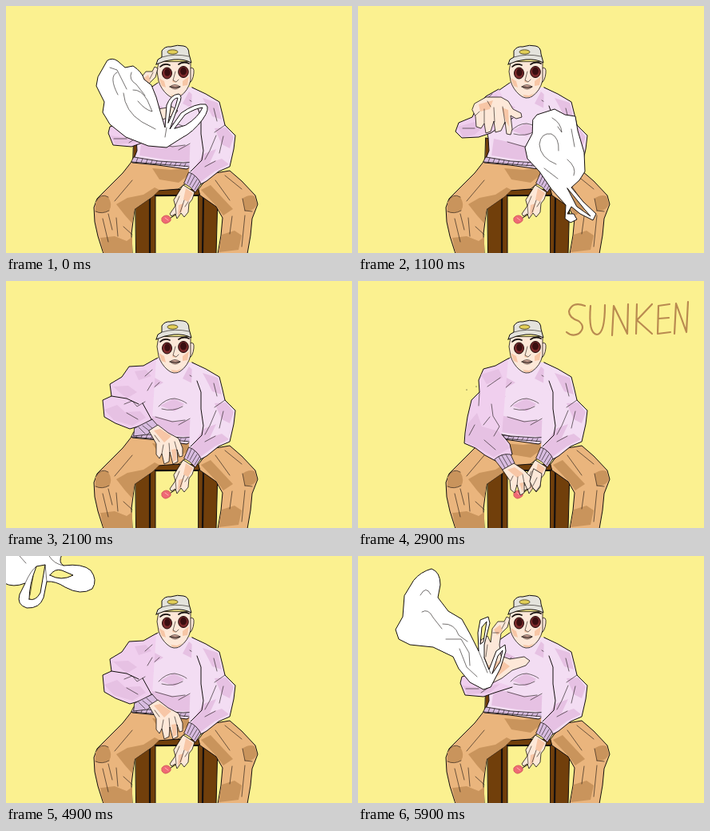
Write an HTML page that moves like this. It is 433 px wide and 309 px high and loops after 6100 ms.

```html
<!DOCTYPE html>
<html lang="en">
<meta charset="utf-8">
<title>Bag and stool</title>
<style>
html, body { margin: 0; width: 100%; height: 100%; overflow: hidden; background: #fbf190 }
svg { display: block; width: 100%; height: 100% }
path { fill: none; stroke: #15100f; stroke-linejoin: round; stroke-linecap: round }
.wool { fill: #f3ddf3 }
.sleeve { fill: #f0cfee }
.cuff { fill: #d8bce0; stroke-width: .8 }
.pants { fill: #eab57d }
.wood { fill: #713f0b }
.skin { fill: #fde8d8; stroke-width: .8 }
.bag { fill: #fff; fill-rule: evenodd }
.shade path { stroke: none }
.plum path { fill: #e6c1e3 }
.tan path { fill: #c9945c }
.blush path { fill: #f7c6a6 }
.thin { stroke-width: .6 }
.bold { stroke-width: 2.2 }
.title path { stroke: #b98a50; stroke-width: 2.2 }
[data-at] { display: none }
</style>
<svg viewBox="0 0 433 309">
  <!-- stool -->
  <path class="wood" d="M160 230L272 229L272 237L160 238Z"/>
  <path class="wood" d="M162 236L187 236L187 310L163 310ZM241 236L265 236L263 310L241 310Z"/>
  <path class="bold" d="M180 239L180 309M247 239L246 309M187 237L241 237"/>
  <path class="wood" data-at="0-1500 5400-6100" d="M160 165L173 168L172 198L159 198Z"/>

  <!-- trousers -->
  <path class="pants" d="M157 195L146 209L132 223L114 241L110 252L111 270L115 288L122 310L158 310L157 285L161 254L184 238L190 231L216 229L230 218L236 201L218 198Z"/>
  <path class="pants" d="M241 229L256 210L280 206L295 219L312 237L315 248L308 266L306 287L302 310L265 310L269 287L271 265L263 251L243 237Z"/>
  <g class="shade tan">
    <path d="M112 245Q119 234 128 239Q134 249 129 256Q119 261 112 257Z"/>
    <path d="M138 248L152 240L172 236L186 227L192 230L184 238L161 254L158 272L149 262Z"/>
    <path d="M118 290L136 288L151 294L158 289L158 309L122 309Z"/>
    <path d="M183 203L207 205L228 202L229 211L216 221L192 217Z"/>
    <path d="M296 241Q304 235 311 238L314 248Q309 258 299 256Z"/>
    <path d="M244 230L256 224L270 239L284 254L272 262L263 250Z"/>
    <path d="M270 286L286 281L295 287L291 305L266 308Z"/>
  </g>
  <path class="thin" d="M112 245Q119 233 128 239M112 257Q120 261 129 256M296 241L299 256M299 256L308 257M136 244L158 218M121 266L128 295M138 265L140 288M128 260L133 280M158 286L147 276M262 218L280 243M283 263L280 285M299 262L295 301M274 212L295 229"/>

  <!-- jumper -->
  <path class="wool" d="M190 96L177 105L163 114L157 138L163 165L164 181L158 196L190 199L226 204L246 193L262 175L262 126L250 112L233 102"/>
  <g class="shade plum">
    <path d="M170 166L188 170L212 176L236 173L245 184L231 195L199 192L167 187Z"/>
    <path d="M193 156L210 147L223 154L211 163Z"/>
    <path d="M229 107L240 117L237 130L221 122Z"/>
    <path d="M171 126L186 121L197 127L181 136L168 135Z"/>
    <path d="M169 139L185 144L176 154L167 151Z"/>
  </g>
  <path class="cuff" d="M160 189L191 194L222 196L236 195L233 201L205 199L157 195Z"/>
  <path class="thin" d="M165 190L163 195M171 191L169 196M177 192L175 197M183 193L181 198M189 194L187 198M195 195L193 199M201 195L199 199M207 196L205 199M213 196L211 200M219 197L217 200M225 197L223 201"/>
  <path class="thin" d="M191 157Q200 147 211 147Q221 149 226 153M195 160Q209 164 221 157M182 136L192 127M187 170L208 176L224 174M216 180L234 170M230 118L240 124"/>

  <!-- resting arm -->
  <path class="wool" d="M233 102L250 110L267 120L271 136L274 149L287 162L285 179L280 201L266 207L251 219L242 224L229 211"/>
  <g class="shade plum">
    <path d="M246 115L265 121L270 142L258 138L253 128Z"/>
    <path d="M261 153L276 152L285 164L280 178L270 173Z"/>
    <path d="M247 185L263 179L255 196L270 191L279 198L261 207L242 221L231 210Z"/>
  </g>
  <path d="M239 125L244 139L244 160L247 181L245 193L231 207"/>
  <path class="thin" d="M274 149L261 158M263 162L255 181L249 192M272 163L267 184M260 128L264 144M249 201L262 194"/>
  <path class="cuff" d="M229 208Q238 211 244 222L237 233Q230 225 223 222Z"/>
  <path class="thin" d="M232 210L227 222M236 213L230 224M239 217L233 227M242 220L236 230"/>
  <path d="M203 267L214 260"/>
  <path class="skin" d="M222 224L236 233L233 242L229 247L228 258L223 264L219 259L214 266L212 260L207 263L205 260L212 250L210 243Z"/>
  <g class="shade blush"><path d="M225 228L234 234L228 245L222 242ZM216 249L222 247L220 257L215 263Z"/></g>
  <path class="thin" d="M217 238L212 250L213 260M223 243L218 258M228 245L224 251"/>
  <path style="fill:#ef6974;stroke:#bd3a48" class="thin" d="M195 265Q199 260 204 263Q209 268 203 271Q198 274 195 269Z"/>
  <path style="stroke:#ffb4b0" d="M199 265L203 268"/>

  <!-- head -->
  <path class="skin" d="M230 78Q236 75 235 84Q234 94 229 97Z"/>
  <path class="skin" d="M191 70L189 82L191 94Q194 104 202 111Q210 118 218 113Q228 106 231 93L231 70Z"/>
  <g class="shade blush"><path d="M191 90L198 94L200 102L195 100ZM229 88L221 94L221 100L227 99ZM209 92L208 95L213 96ZM206 111L214 112L221 109L215 114L209 114Z"/></g>
  <g fill="#7d2b2c" stroke="#1a0708">
    <ellipse cx="201.5" cy="84" rx="6" ry="7"/><ellipse cx="222" cy="82.5" rx="6.3" ry="7"/>
  </g>
  <g fill="#3a0f11"><ellipse cx="202" cy="83" rx="3.7" ry="4.8"/><ellipse cx="222" cy="81.5" rx="4" ry="4.8"/></g>
  <path style="stroke-width:1.7" d="M193 76Q198 71 205 74M216 73Q222 69 229 72"/>
  <path class="thin" d="M212 82L209 93L213 95L216 92"/>
  <path class="thin" style="fill:#d2a596" d="M205 101Q211 96 218 101Q212 107 205 101Z"/>
  <path d="M206 101Q212 103 218 101"/>
  <path style="fill:#e4e3dc" d="M188 73L190 67L195 64L195 56Q199 50 206 51Q215 48 222 50Q229 51 229 60L232 71Q223 66 210 67Q198 68 188 73Z"/>
  <path class="thin" d="M195 64Q211 59 229 63"/>
  <ellipse cx="208.5" cy="57.5" rx="6.5" ry="2.7" fill="#e3cf58" stroke="#3b3516" stroke-width=".8"/>

  <!-- raised arm -->
  <g data-at="0-1100 5400-6100">
    <path class="sleeve" d="M145 147L130 151L128 159L134 174L157 176L171 171L193 164"/>
    <g class="shade plum"><path d="M131 162L151 165L178 160L165 171L137 173Z"/></g>
    <path class="thin" d="M135 166L151 166M154 171L166 163"/>
    <path class="skin" d="M154 147L149 123L154 105L162 100L166 108L168 91L175 82L183 82L186 76L190 78L187 89L179 97L177 111L179 125L190 129L208 126L215 131L210 137L193 143L180 153L166 160Z"/>
    <g class="shade blush"><path d="M170 92L178 86L181 94L174 99ZM160 138L179 130L190 138L170 154Z"/></g>
    <path class="thin" d="M169 96L176 96M162 111L160 126M181 130L173 140M184 83L180 91"/>
  </g>

  <!-- arm letting go -->
  <g data-at="1100-1500">
    <path class="sleeve" d="M176 104L160 113L150 123L143 139L126 146L122 157L130 165L151 164L166 159L194 140"/>
    <g class="shade plum"><path d="M125 151L146 145L155 153L146 161L131 164ZM160 115L173 111L183 118L165 121Z"/></g>
    <path class="thin" d="M131 153L146 153M161 116L168 110"/>
    <path class="skin" d="M146 122L160 114L179 114L188 119L194 129L204 134L205 139L198 141L191 137L193 154L191 161L186 160L184 145L179 156L172 158L170 144L166 157L160 159L158 147L154 153L148 151L147 138L143 130Z"/>
    <g class="shade blush"><path d="M151 123L169 118L165 129L153 132ZM180 127L188 130L189 151L185 144Z"/></g>
    <path class="thin" d="M158 147L158 129M171 145L170 127M184 146L181 126M147 137L152 132M162 119L166 126"/>
  </g>

  <!-- arm lowering -->
  <g data-at="1500-2100">
    <path class="sleeve" d="M188 97L151 113L149 123L136 135L124 139L125 151L132 165L157 166L170 158L189 150"/>
    <g class="shade plum"><path d="M127 142L145 137L157 150L153 163L134 164ZM154 114L168 111L178 119L160 125Z"/></g>
    <path class="thin" d="M137 136L155 136L165 129M133 154L149 151M169 132L162 144M174 116L183 111"/>
    <path class="cuff" d="M158 154L179 144L186 151L163 164Z"/>
    <path class="skin" d="M160 158L178 150L192 155L201 168L215 178L216 184L208 185L201 180L204 193L199 201L195 195L193 182L189 193L184 194L182 182L178 190L172 192L171 180L167 189L161 187L162 173L157 166Z"/>
    <g class="shade blush"><path d="M165 162L179 158L177 170L167 172ZM195 169L202 178L198 192L194 181Z"/></g>
    <path class="thin" d="M171 180L172 169M182 183L182 168M193 183L190 166M176 157L184 161"/>
  </g>

  <!-- arm on thigh -->
  <g data-at="2100-2700 4900-5400">
    <path class="sleeve" d="M188 97L172 106L154 107L145 120L130 129L132 144L121 149L123 170L137 178L155 185L169 181L183 173"/>
    <g class="shade plum"><path d="M123 161L139 155L149 164L168 163L175 171L158 181L135 174ZM134 132L153 131L164 139L151 147ZM161 113L175 111L182 119L166 124Z"/></g>
    <path d="M132 144L151 147L166 154M171 153L182 173"/>
    <path class="thin" d="M148 154L158 150L164 157L174 151M151 165L165 173M174 119L183 111M183 127L177 137"/>
    <path class="cuff" d="M161 184L183 173L190 181L177 192L160 194Z"/>
    <path class="thin" d="M166 183L174 191M171 181L180 188M176 178L184 185"/>
    <path class="skin" d="M179 187L190 180L203 190L216 197L221 209L221 219L217 220L214 211L215 226L209 229L205 214L204 226L198 229L195 216L192 222L188 217L188 204Z"/>
    <g class="shade blush"><path d="M185 187L193 185L207 194L198 202ZM207 211L213 210L213 224L209 226Z"/></g>
    <path class="thin" d="M195 216L197 205M205 215L204 203M214 212L211 201M186 193L192 201"/>
  </g>

  <!-- hands together -->
  <g data-at="2700-4900">
    <path class="sleeve" d="M188 97L172 106L157 110L151 124L152 139L142 149L137 170L134 190L133 203L147 209L159 218L172 225L193 217L190 204L180 192"/>
    <g class="shade plum"><path d="M137 179L149 165L155 182L176 188L190 209L170 220L151 209L134 201ZM154 117L176 110L181 121L161 129Z"/></g>
    <path class="thin" d="M152 139L151 156M146 180L139 193M167 154L169 169L177 182L170 194M158 199L172 211M162 132L178 121M165 170L157 180M180 192L193 195"/>
    <path class="cuff" d="M171 223Q180 215 191 217L196 228L182 237Z"/>
    <path class="thin" d="M176 220L184 234M180 218L188 232M185 217L192 229"/>
    <path class="skin" d="M181 236L195 228L207 236L216 245L216 258L212 261L208 252L208 265L203 268L199 255L196 265L191 261L190 250Z"/>
    <path class="skin" d="M220 235L230 241L228 256L223 263L219 259L215 251Z"/>
    <g class="shade blush"><path d="M187 236L196 233L207 241L199 246ZM202 253L207 252L206 264Z"/></g>
    <path class="thin" d="M199 256L200 245M208 253L206 242M191 250L194 244M224 246L219 256"/>
    <g fill="#111"><circle cx="148" cy="132" r=".6"/><circle cx="136" cy="136" r=".6"/></g>
  </g>

  <!-- bag -->
  <g data-at="0-200">
    <path class="bag" d="M127 68Q133 64 140 69L149 77L159 75Q170 82 173 92L182 99L188 114L193 132L199 152L201 124Q206 111 216 110Q222 112 216 124L205 154L219 134Q237 121 250 123Q256 128 246 142Q234 158 220 165L201 177L178 175L150 164L130 148L121 133L123 120L113 100L115 89ZM203 146L207 122Q210 115 215 115L212 126ZM211 153L224 136Q237 128 246 127Q241 139 225 149Z"/>
    <path class="thin" d="M130 77L139 80L151 104M140 111Q128 88 139 83M157 83Q153 92 163 98L174 112M147 109Q149 132 170 145L187 154M159 105Q169 104 177 118L183 132Q174 130 165 119M201 152L199 164"/>
  </g>
  <g data-at="200-400">
    <path class="bag" d="M164 111L177 101L204 97L222 105L244 107L263 120L272 139L266 156L249 167L226 172L207 179L190 173L180 160L165 151L157 132Z"/>
    <path class="thin" d="M180 113Q170 132 189 148M204 109Q226 113 234 132L229 147M190 162L208 151L221 158M249 121L258 139"/>
  </g>
  <g data-at="400-600">
    <path class="bag" d="M198 128L216 112L243 104L270 96L292 103L309 119L312 140L299 158L279 169L255 176L239 181L231 168L211 167L196 154L205 147Z"/>
    <path class="thin" d="M225 124Q210 143 231 156M250 113Q276 109 288 126L284 145M238 164L254 152L266 158M294 116L300 133"/>
  </g>
  <g data-at="600-1100">
    <path class="bag" d="M226 119L250 105L278 104L303 117L315 145L309 177L296 203L286 219L290 238L281 240L273 218L261 223L253 216L257 207L232 190L219 164L215 140Z"/>
    <path class="thin" d="M236 139Q226 167 251 182M255 119Q283 120 290 146L280 173M264 211L274 191M292 129L302 153"/>
  </g>
  <g data-at="1100-1300">
    <path class="bag" d="M219 142L224 136L246 129L259 136L272 138L275 156L283 183L284 207L277 218L267 227L282 245L298 260L294 268L278 260L267 251L262 260L270 260L274 267L266 271L259 266L260 249L242 229L227 207L212 191L209 177L218 160ZM262 228L284 255L291 263L274 251Z"/>
    <path class="thin" d="M248 198Q228 190 227 173Q229 158 242 160Q252 165 251 181M243 140Q254 146 255 158L250 151M267 154L271 176M262 192Q274 202 270 212M233 203L250 216"/>
  </g>
  <g data-at="1300-1500">
    <path class="bag" d="M224 181L244 172L269 175L292 181L302 201L300 228L303 249L292 267L291 285L281 304L273 301L277 282L268 279L260 295L250 291L253 273L236 255L225 227Z"/>
    <path class="thin" d="M251 199Q236 217 251 235L269 233M275 196L287 212L283 231M259 260L276 251"/>
  </g>
  <g data-at="1500-1600">
    <path class="bag" d="M231 205L249 196L275 198L294 199L303 218L298 237L302 257L291 275L289 294L280 308L271 296L262 307L251 298L244 280L235 253L230 226Z"/>
    <path class="thin" d="M251 222Q240 239 254 252L268 246M273 220L285 233L280 250M259 285L274 274"/>
  </g>
  <g data-at="1600-1700">
    <path class="bag" d="M235 219L246 212L266 216L278 208L291 210L299 219L297 239L301 258L293 277L291 296L284 309L279 307L276 297L269 308L261 309L258 302L249 302L242 288L244 272L235 256L232 237Z"/>
    <path class="thin" d="M249 232Q259 225 268 232L270 248Q259 252 251 248ZM272 257Q283 251 288 260L284 277L269 278M261 305L264 296M279 308L285 300"/>
  </g>
  <g data-at="1700-1900">
    <path class="bag" d="M231 274L244 260L268 263L290 256L310 268L317 287L312 310L232 310Z"/>
    <path class="thin" d="M250 281Q263 270 273 284L267 303M289 273L299 287L294 309"/>
  </g>
  <g data-at="1900-2100">
    <path class="bag" d="M246 310L253 297L272 292L291 296L312 288L326 299L330 310Z"/>
    <path class="thin" d="M268 309L276 300L287 309"/>
  </g>
  <g data-at="4900-5400">
    <path class="bag" d="M-2 34Q9 40 24 34L17 48Q13 61 26 65Q42 66 47 52L51 32Q62 31 74 39Q94 50 108 41Q115 30 106 18Q96 9 72 12Q65 8 70 -2L-2 -2ZM29 54Q29 36 38 13L49 11L43 46Q37 57 29 54ZM55 24Q61 15 70 18L84 24Q69 32 55 24Z"/>
    <path class="thin" d="M24 34Q31 18 38 13M51 32L49 11M54 0Q60 10 72 12M17 0L25 9M34 25L30 49"/>
  </g>
  <g data-at="5400-5900">
    <path class="bag" d="M-2 51L20 59L41 73L61 86L70 101L80 103L86 90L84 80L99 86L120 81L125 70L113 60L91 60L84 45L78 25L62 14L57 -2L-2 -2ZM69 84L78 85L79 96ZM91 69L109 65L117 72L101 78Z"/>
    <path class="thin" d="M18 13Q41 22 45 43M17 37L41 49L61 64M51 25L67 40"/>
  </g>
  <g data-at="5900-6100">
    <path class="bag" d="M70 30Q78 20 92 16Q103 20 103 36L100 52L113 69L130 79L140 97L151 119L150 96L153 80L163 76L165 84L158 111L158 127L164 142L173 119L184 111L185 119L178 141L166 164L157 167L140 158L126 141L119 126L94 114L65 111L51 104L47 92L56 76L58 50ZM153 110L155 89L161 82L157 107ZM168 147L175 125L181 118L178 132Z"/>
    <path class="thin" d="M78 49Q85 36 91 48M80 70Q88 65 94 77L105 91M106 85Q121 84 126 99L137 107M110 104L129 104L139 121L140 137M127 116L136 139L149 151M151 119L162 146M158 127L166 147"/>
  </g>

  <!-- lettering -->
  <g class="title" role="img" aria-label="SUNKEN" data-at="2900-4900">
    <path d="M284 31Q268 25 264 38Q264 46 276 50Q286 58 276 66Q268 70 261 64M291 31Q288 66 299 67Q309 66 309 30M318 68L320 31L337 66L338 29M349 29L348 66M368 29L349 49L368 66M390 29L376 31L375 66L391 64M376 47L389 46M396 66L398 28L411 64L413 26"/>
  </g>
  <g class="title" role="img" aria-label="CHALET" data-at="3900-4900">
    <path d="M287 77Q268 80 266 97Q267 113 286 109M294 76L293 111M313 75L314 111M293 94L314 92M321 111L333 75L346 110M326 98L341 97M354 75L353 110L371 109M391 76L378 77L377 111L392 110M378 93L389 92M394 78L415 76M405 77L406 113"/>
  </g>
</svg>
<script>
const LOOP = 6100;
const poses = [...document.querySelectorAll('[data-at]')].map(node => ({
  node,
  spans: node.dataset.at.split(' ').map(span => span.split('-').map(Number))
}));
const start = performance.now();

function draw(now) {
  const t = Math.max(0, now - start) % LOOP;
  for (const { node, spans } of poses) {
    node.style.display = spans.some(([from, to]) => t >= from && t < to) ? 'inline' : 'none';
  }
  requestAnimationFrame(draw);
}
draw(start);
</script>
</html>
```
